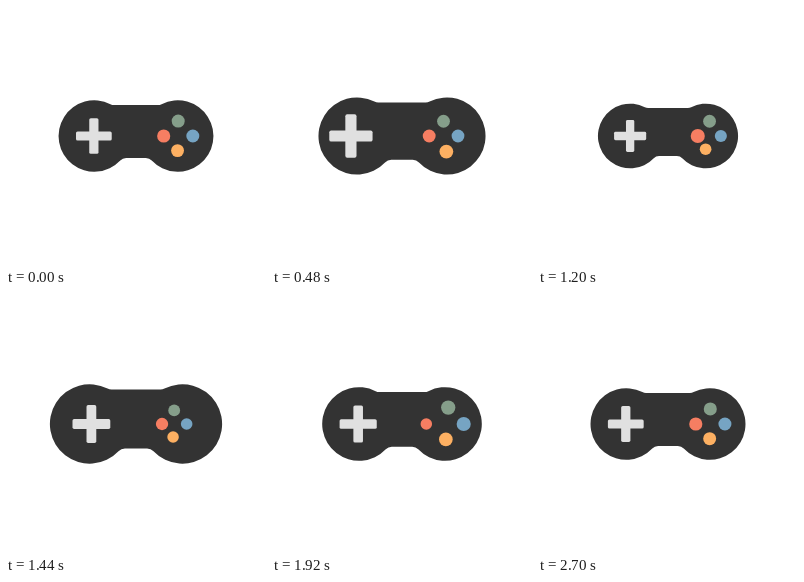
Recreate the animation shown at these times as an HTML page. Size 260 px wide and 260 px high, loop 2760 ms.

```html
<!DOCTYPE html>
<html lang="en">
<head>
<meta charset="utf-8">
<title>Gamepad pulse</title>
<style>
  html, body { margin: 0; width: 100%; height: 100%; overflow: hidden; background: #fff; }
  svg { display: block; width: 100vw; height: 100vh; }
</style>
</head>
<body>
<svg id="stage" viewBox="-130 -130 260 260"></svg>
<script>
const LOOP = 2760, STEP = 60, LAG = 150;
const stage = document.getElementById('stage');

function add(tag, attrs, parent) {
  const el = document.createElementNS('http://www.w3.org/2000/svg', tag);
  for (const key in attrs) el.setAttribute(key, attrs[key]);
  return parent.appendChild(el);
}

// Two round grips joined by a bar with filleted corners
function bodyPath() {
  const cx = 41.7, r = 35.7, f = 8, top = -31, bottom = 22;
  const joint = (y, dir) => {
    const dy = y + dir * f;
    const dx = Math.sqrt((r + f) ** 2 - dy * dy);
    const k = r / (r + f);
    return { flat: cx - dx, x: cx - dx * k, y: dy * k };
  };
  const a = joint(top, -1), b = joint(bottom, 1);
  return `M${-a.flat} ${top}H${a.flat}A${f} ${f} 0 0 0 ${a.x} ${a.y}` +
    `A${r} ${r} 0 1 1 ${b.x} ${b.y}A${f} ${f} 0 0 0 ${b.flat} ${bottom}` +
    `H${-b.flat}A${f} ${f} 0 0 0 ${-b.x} ${b.y}` +
    `A${r} ${r} 0 1 1 ${-a.x} ${a.y}A${f} ${f} 0 0 0 ${-a.flat} ${top}Z`;
}

function cross(parent) {
  const bar = (x, y, width, height) =>
    add('rect', { x, y, width, height, rx: 1.6, fill: '#e0e0e0' }, parent);
  bar(-59.8, -4.6, 35.6, 9.2);
  bar(-46.6, -17.8, 9.2, 35.6);
}

const button = (cx, cy, fill) => parent =>
  add('circle', { cx, cy, r: 6.4, fill }, parent);

// Each part trails the one before it by LAG
const parts = [
  parent => add('path', { d: bodyPath(), fill: '#333' }, parent),
  cross,
  button(41.2, 14.5, '#fdb062'),
  button(56, 0, '#76a4c3'),
  button(41.4, -14.7, '#859e8a'),
  button(27, 0, '#f67e62')
].map(draw => {
  const group = add('g', {}, stage);
  draw(group);
  return group;
});

const smooth = x => x * x * (3 - 2 * x);

// Swell, slow shrink, second swell, long settle
function pulse(t) {
  if (t < 110) return 1;
  if (t < 300) return 1 + 0.25 * smooth((t - 110) / 190);
  if (t < 1185) return 0.9 + 0.35 * (1 - (t - 300) / 900) ** 3;
  if (t < 1360) return 0.9 + 0.25 * smooth((t - 1185) / 175);
  const d = t - 1360;
  const rest = 0.08 * Math.exp(-d / 180) + 0.07 * Math.exp(-d / 600);
  return 1 + rest * Math.min(1, (LOOP - t) / 400);
}

function render(ms) {
  const t = Math.floor((ms % LOOP) / STEP) * STEP;
  parts.forEach((group, i) => {
    const s = pulse((t - i * LAG + LOOP) % LOOP);
    group.setAttribute('transform', `scale(${s.toFixed(4)})`);
  });
}

const start = performance.now();
function frame() {
  render(performance.now() - start);
  requestAnimationFrame(frame);
}
frame();
</script>
</body>
</html>
```
